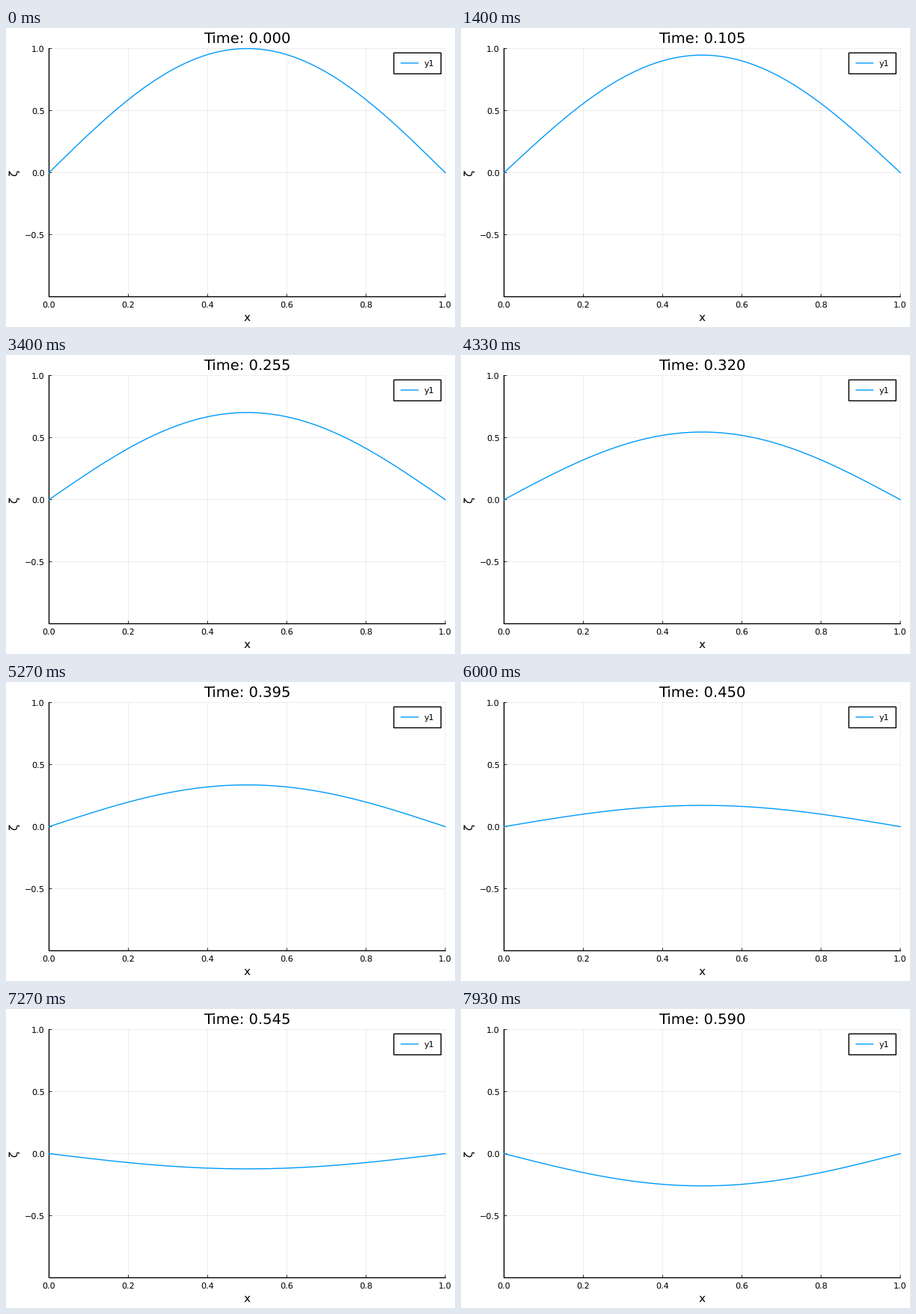
Write a matplotlib script that moves like this. It is 600 px wide and 400 px high and loops after 8000 ms.

```python
import numpy as np
import matplotlib.pyplot as plt
from matplotlib.animation import FuncAnimation
from matplotlib.patches import Rectangle

W, H, DPI = 600, 400, 100
FRAMES, LOOP_MS = 120, 8000
DT = 0.005
OMEGA = 3.108
LEFT, RIGHT, TOP, BOTTOM = 57.5, 587.0, 27.5, 359.5
BLUE = "#009AFA"
THIN = 72 / DPI  # one pixel in points

plt.rcParams.update({"font.family": "DejaVu Sans", "text.hinting": "none"})

fig = plt.figure(figsize=(W / DPI, H / DPI), dpi=DPI, facecolor="white")
ax = fig.add_axes([0, 0, 1, 1])
ax.set_xlim(0, W)
ax.set_ylim(H, 0)
ax.axis("off")


def px(x):
    return LEFT + x * (RIGHT - LEFT)


def py(y):
    return BOTTOM + (y + 1) / 2 * (TOP - BOTTOM)


def line(xs, ys, color="black", width=1.4, **kw):
    return ax.plot(xs, ys, color=color, lw=width * THIN, snap=False, **kw)[0]


def label(x, y, text, size, ha="center", **kw):
    return ax.text(x, y, text, fontsize=size, ha=ha, va="baseline", **kw)


# grid, ticks and tick labels
for x in np.arange(6) / 5:
    line([px(x)] * 2, [TOP, BOTTOM], width=0.7, alpha=0.1)
    line([px(x)] * 2, [BOTTOM, BOTTOM - 3.5], width=0.8)
    label(px(x), 374, f"{x:.1f}", 8)
for y in (-0.5, 0.0, 0.5, 1.0):
    line([LEFT, RIGHT], [py(y)] * 2, width=0.7, alpha=0.1)
    line([LEFT, LEFT + 3.5], [py(y)] * 2, width=0.8)
    label(51.5, py(y) + 4.3, f"{y:.1f}".replace("-", "\u2212"), 8, ha="right")

line([LEFT, LEFT, RIGHT], [TOP, BOTTOM, BOTTOM])
label(322, 392, "x", 11)
label(15, 193.5, "\u03b6", 11, rotation=90, rotation_mode="anchor")

grid_x = np.linspace(0, 1, 201)
mode = np.sin(np.pi * grid_x)
curve = line(px(grid_x), py(mode), BLUE, zorder=3)
title = label(322, 20, "", 14)

# legend
ax.add_patch(Rectangle((518.3, 33.3), 63, 28, fc="white", ec="black",
                       lw=1.4 * THIN, snap=False, zorder=4))
line([528, 550.5], [46.9] * 2, BLUE, zorder=5)
label(559, 51, "y1", 8, ha="left", zorder=5)


def draw(i):
    t = i * DT
    curve.set_ydata(py(np.cos(OMEGA * t) * mode))
    title.set_text(f"Time: {t:.3f}")
    return curve, title


anim = FuncAnimation(fig, draw, frames=FRAMES, interval=LOOP_MS / FRAMES,
                     repeat=True, repeat_delay=0)
plt.show()
```
